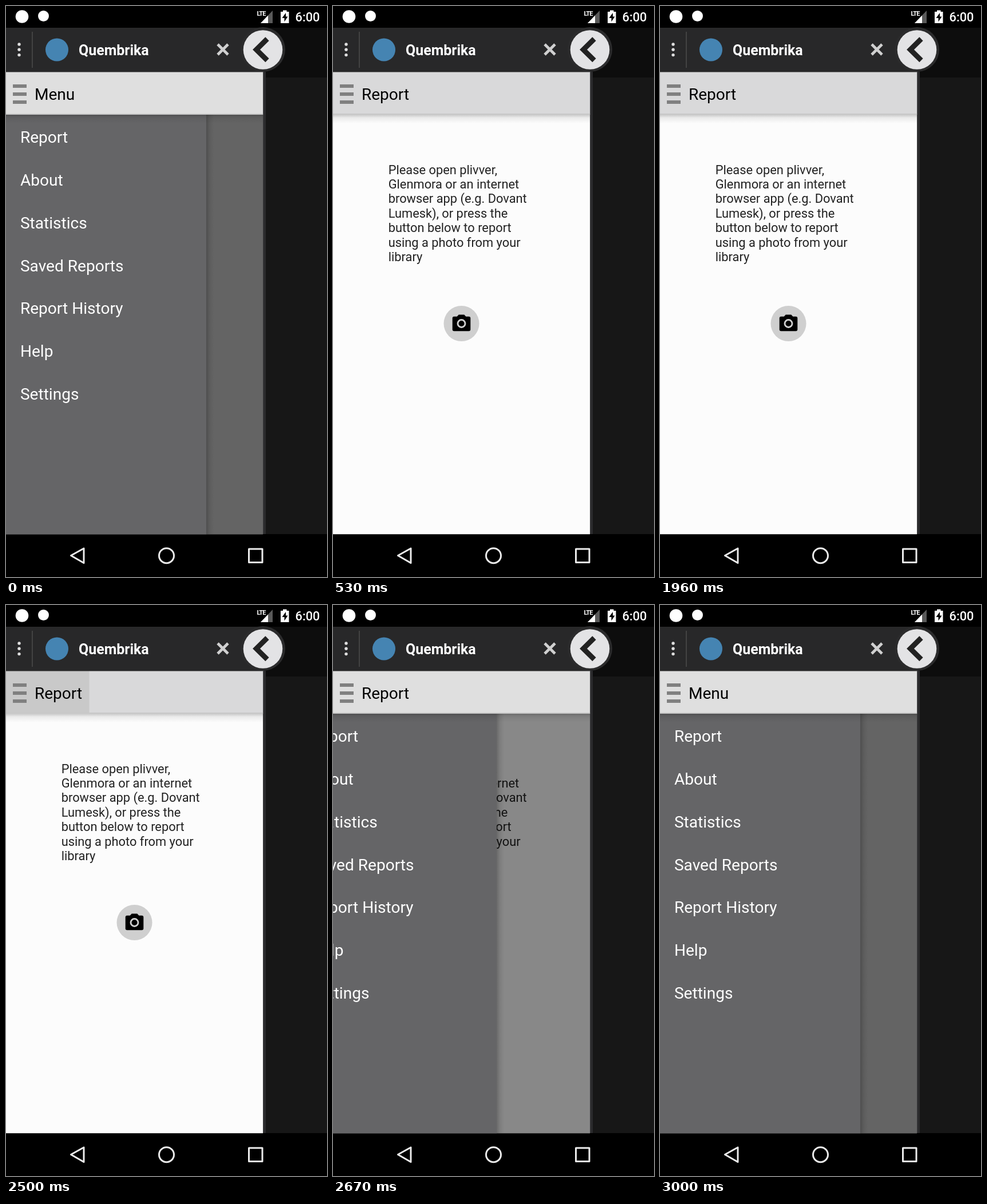
These frames come from a looping animation (561 by 998 pixels, 4730 ms). An HTML page:

```html
<!DOCTYPE html>
<html lang="en">
<head>
<meta charset="utf-8">
<title>Side menu</title>
<style>
  html, body { margin: 0; width: 100%; height: 100%; overflow: hidden; background: #000; }
  svg { display: block; width: 561px; height: 998px; font-family: Roboto, sans-serif; }
  .large { font-size: 28.07px; }
  .body { font-size: 21.83px; fill: #222; }
  .nav { fill: none; stroke: #ececec; stroke-width: 3; stroke-linejoin: round; }
</style>
</head>
<body>
<svg viewBox="0 0 561 998">
  <defs>
    <linearGradient id="side">
      <stop offset="0" stop-opacity=".22"/>
      <stop offset=".4" stop-opacity=".09"/>
      <stop offset="1" stop-opacity="0"/>
    </linearGradient>
    <linearGradient id="below" x2="0" y2="1">
      <stop offset="0" stop-opacity=".2"/>
      <stop offset=".35" stop-opacity=".07"/>
      <stop offset="1" stop-opacity="0"/>
    </linearGradient>
    <clipPath id="page"><path d="M0 115H449.100V923.150H0z"/></clipPath>
  </defs>

  <!-- backdrop -->
  <path d="M0 0H561V998H0z"/>
  <path d="M449 38H561V125H449z" fill="#0d0d0d"/>
  <path d="M449 125H561V923H449z" fill="#171717"/>
  <path d="M449 115H454V923H449z" fill="#2b2b2d"/>

  <!-- page -->
  <g clip-path="url(#page)">
    <path d="M0 115H450V924H0z" fill="#fcfcfc"/>
    <g class="body" id="lines"></g>
    <circle cx="224.500" cy="555" r="31" fill="#cfcfcf"/>
    <path d="M219.700 539.500h9.600l3 3.200h5a3 3 0 0 1 3 3v19.500a3 3 0 0 1-3 3h-25.600a3 3 0 0 1-3-3v-19.500a3 3 0 0 1 3-3h5z"/>
    <circle cx="224.500" cy="555" r="6.500" fill="none" stroke="#cfcfcf" stroke-width="2.900"/>
    <path id="scrim" d="M0 115H450V924H0z"/>
    <g id="drawer">
      <path d="M0 115H350V924H0z" fill="#656567"/>
      <path d="M350 115h13V924h-13z" fill="url(#side)"/>
      <g class="large" id="items" fill="#fff"></g>
    </g>
    <path d="M0 190H450V205H0z" fill="url(#below)"/>
    <path id="bar" d="M0 115H450V190H0z"/>
    <path id="press" d="M0 115H145.500V188H0z" fill="#c9c9c9"/>
    <path d="M0 188H450V190H0z" fill="#c8c8c8"/>
    <path d="M12 137h24v6H12zm0 14h24v6H12zm0 14h24v6H12z" fill="#808080"/>
    <text class="large" id="heading" x="49.900" y="164"></text>
  </g>

  <!-- floating header -->
  <path d="M0 38H449V115.400H0z" fill="#282829"/>
  <circle cx="449" cy="76" r="39" fill="#2b2b2c"/>
  <circle cx="449" cy="76.500" r="34.300" fill="#e3e3e5"/>
  <path d="M456.500 57.500L437.500 76.300L456.500 95" fill="none" stroke="#222" stroke-width="9"/>
  <g fill="#dedede">
    <circle cx="23" cy="67" r="2.700"/>
    <circle cx="23" cy="76.300" r="2.700"/>
    <circle cx="23" cy="85.600" r="2.700"/>
  </g>
  <path d="M46 45V108" stroke="#4c4c4c" stroke-width="1.500"/>
  <circle cx="89" cy="76.500" r="20" fill="#4584b2"/>
  <text x="127" y="85.800" font-size="24.950" font-weight="700" fill="#fff">Quembrika</text>
  <path d="M370 67L388 85M388 67L370 85" stroke="#d0d0d0" stroke-width="4.800"/>

  <!-- status bar -->
  <g fill="#fff">
    <circle cx="28" cy="18.500" r="11.300"/>
    <circle cx="65.500" cy="17.500" r="9.500"/>
    <path d="M445 30L466 8V30z" fill="#5a5a5a"/>
    <path d="M445 30L458 16.500V30z"/>
    <text x="438.500" y="17" font-size="11" font-weight="700" letter-spacing="-1">LTE</text>
    <path d="M480 10h4V7.500h6.500V10h4v20H480z"/>
    <path d="M489 12l-6.500 9h4v6.500l6-9h-3.500z" fill="#000"/>
    <text x="505.500" y="27" font-size="21.830" font-weight="500">6:00</text>
  </g>

  <!-- navigation bar -->
  <g class="nav">
    <path d="M113.500 960.500L136 948V973.500z"/>
    <circle cx="280.500" cy="960.700" r="13"/>
    <path d="M424.500 949h23.500v23.500h-23.500z"/>
  </g>
</svg>
<script>
  const LOOP = 4730, CUT = 40, PRESS = 2500, RELEASE = 2540;
  const SLIDE = 2523, SLIDE_TIME = 512, OPENED = 2960, WIDTH = 350;
  const $ = id => document.getElementById(id);
  const scrim = $('scrim'), drawer = $('drawer'), bar = $('bar');
  const press = $('press'), heading = $('heading');

  function addRows(parent, rows, x, y, step) {
    rows.forEach((row, i) => {
      const text = document.createElementNS(parent.namespaceURI, 'text');
      text.setAttribute('x', x);
      text.setAttribute('y', y + i * step);
      text.textContent = row;
      parent.append(text);
    });
  }

  addRows($('lines'), [
    'Please open plivver,',
    'Glenmora or an internet',
    'browser app (e.g. Dovant',
    'Lumesk), or press the',
    'button below to report',
    'using a photo from your',
    'library'
  ], 96.7, 293.5, 25.45);
  addRows($('items'), ['Report', 'About', 'Statistics', 'Saved Reports',
    'Report History', 'Help', 'Settings'], 24.95, 239, 74.85);

  // Quintic ease-out of the drawer, 0 closed to 1 open
  function openness(t) {
    if (t < CUT) return 1;
    const p = Math.min(Math.max((t - SLIDE) / SLIDE_TIME, 0), 1);
    return 1 - (1 - p) ** 5;
  }

  function draw(t) {
    const open = openness(t);
    const shade = t < CUT ? 1 : openness(Math.max(t - 16.7, CUT));  // dims one tick late
    drawer.setAttribute('transform', `translate(${Math.round((open - 1) * WIDTH)} 0)`);
    drawer.style.display = open > 0 ? '' : 'none';
    scrim.style.opacity = 0.6 * shade;
    bar.style.fill = t < CUT || t >= RELEASE ? '#dfdfdf' : '#d9d9da';
    press.style.display = t >= PRESS && t < RELEASE ? '' : 'none';
    heading.textContent = t < CUT || t >= OPENED ? 'Menu' : 'Report';
  }

  const start = performance.now();
  function tick() {
    draw((performance.now() - start) % LOOP);
    requestAnimationFrame(tick);
  }
  draw(0);
  requestAnimationFrame(tick);
</script>
</body>
</html>
```
